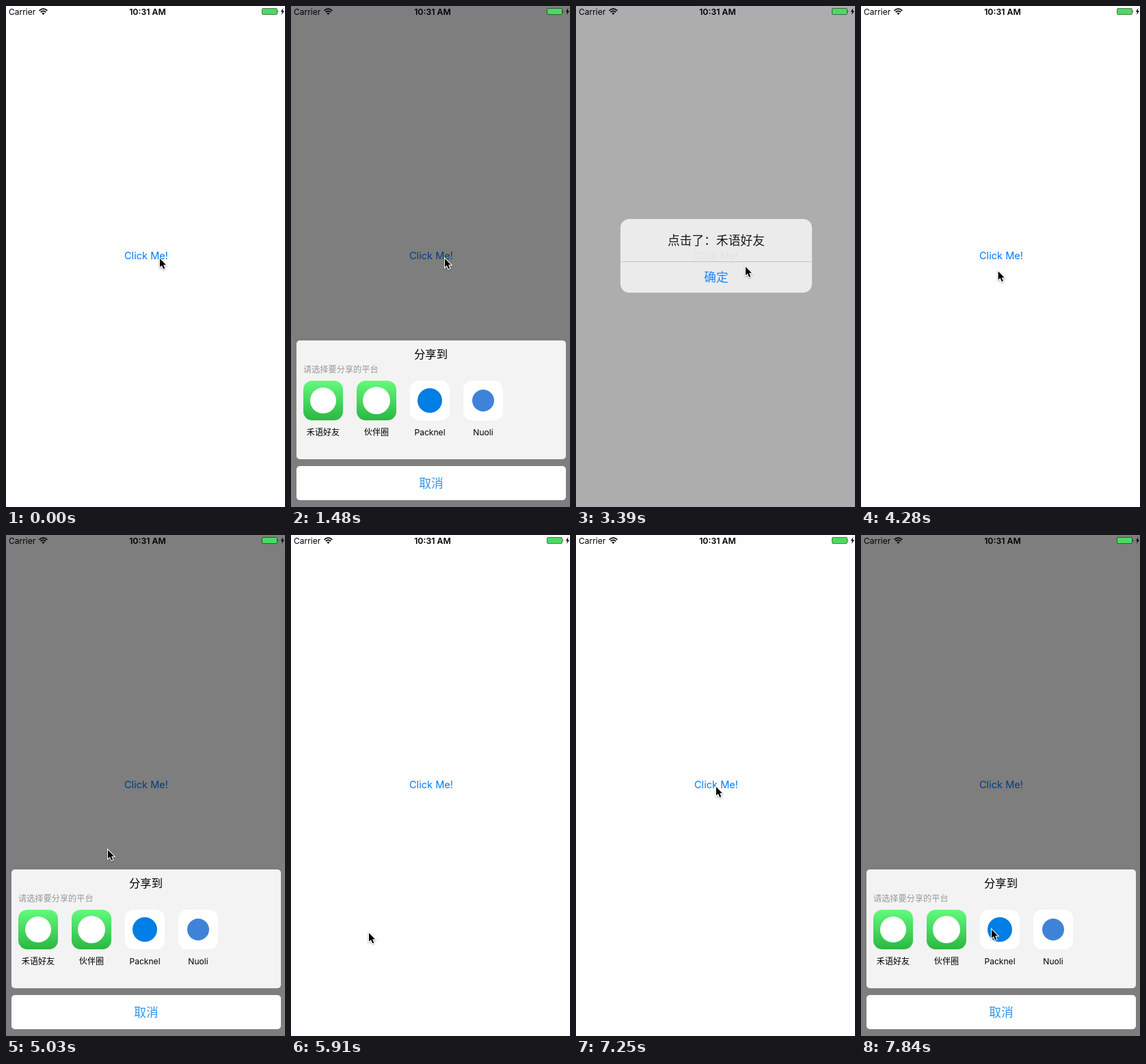
Animation, 408 px wide and 734 px high, one loop 7.99 s. Source, as an HTML page:

```html
<!DOCTYPE html>
<html lang="zh-CN">
<head>
<meta charset="utf-8">
<title>Share sheet</title>
<style>
html, body { margin: 0; width: 100%; height: 100%; overflow: hidden; background: #fefefe; }
svg { display: block; width: 408px; height: 734px; }
text { font-family: Inter, 'Noto Sans CJK SC', 'Noto Sans CJK', sans-serif; }
.mid { text-anchor: middle; }
</style>
</head>
<body>
<svg viewBox="0 0 408 734">
  <defs>
    <linearGradient id="green" x2="0" y2="1">
      <stop stop-color="#62fb7c"/><stop offset="1" stop-color="#2bb741"/>
    </linearGradient>
    <filter id="shadow" x="-50%" y="-50%" width="200%" height="200%">
      <feDropShadow dx="0" dy="1" stdDeviation="1" flood-opacity=".4"/>
    </filter>
  </defs>
  <rect width="408" height="734" fill="#fefefe"/>
  <text class="mid" x="205" y="371.3" font-size="14.6" fill="#007aff">Click Me!</text>
  <rect id="dim" width="408" height="734"/>

  <g id="sheet">
    <rect x="8" y="490" width="394" height="174" rx="5" fill="#f3f3f3"/>
    <text class="mid" x="204.5" y="516.3" font-size="16.4">分享到</text>
    <text x="18" y="536.5" font-size="12.2" fill="#999">请选择要分享的平台</text>
    <g id="apps"></g>
    <rect x="8" y="674" width="394" height="50" rx="5" fill="#fff"/>
    <text class="mid" x="205" y="705.7" font-size="17.8" fill="#2f96f3">取消</text>
  </g>

  <g id="alert">
    <rect x="-133" y="-51.3" width="266" height="102.6" rx="12.3" fill="#f2f2f2"/>
    <text id="message" class="mid" y="-15.6" font-size="16.85" font-weight="500" fill="#0a0a0a"></text>
    <path d="M-133 8.2H133" stroke="#cacaca"/>
    <text class="mid" y="36.4" font-size="16.85" fill="#1080ff">确定</text>
  </g>

  <g id="status">
    <text x="4" y="12.8" font-size="12">Carrier</text>
    <path d="M48.6 6.8Q54.5 1.4 60.4 6.8M50.7 9Q54.5 5.6 58.3 9" fill="none" stroke="#000" stroke-width="1.7"/>
    <path d="M54.5 13L52.4 10.6Q54.5 8.9 56.6 10.6Z"/>
    <text class="mid" x="207" y="12.8" font-size="12.3" font-weight="600">10:31 AM</text>
    <rect x="374.5" y="3.5" width="22" height="9" rx="1.5" fill="#4cd964" stroke="#000" stroke-width=".5"/>
    <path d="M397.6 6.2Q399.2 8 397.6 9.8Z"/>
    <path d="M405.4 3L401.8 8.6H404.1L403 13L407 7.2H404.6Z"/>
  </g>

  <path id="cursor" d="M1 2V14.6L3.9 11.9L6.2 17.2L8.3 16.3L6.1 11.2H10Z"
        stroke="#fff" stroke-width="2" paint-order="stroke" filter="url(#shadow)"/>
</svg>
<script>
const LOOP = 7990, STEP = 147.9; // ms; the screen refreshes once per step
const $ = id => document.getElementById(id);
const ramp = (n, start, length) => Math.min(1, Math.max(0, (n - start) / length));

const apps = [
  { name: '禾语好友', tile: 'url(#green)', mark: '#fff', r: 19 },
  { name: '伙伴圈', tile: 'url(#green)', mark: '#fff', r: 20 },
  { name: 'Packnel', tile: '#fff', mark: '#007ee5', r: 18 },
  { name: 'Nuoli', tile: '#fff', mark: '#3f83d8', r: 16 }
];
$('apps').innerHTML = apps.map(({ name, tile, mark, r }, i) => {
  const x = 47 + 78 * i;
  return `<rect x="${x - 29}" y="549" width="58" height="58" rx="13" fill="${tile}"/>
    <circle cx="${x}" cy="578" r="${r}" fill="${mark}"/>
    <text class="mid" x="${x}" y="628.5" font-size="12.1">${name}</text>`;
}).join('');

// Each visit opens the sheet, then picks the app with the same index.
const visits = [
  { open: 7, pick: 20 },
  { open: 31, pick: 38 },
  { open: 50, pick: Infinity }
];

// Mouse moves: start step, length in steps, destination.
const moves = [
  [11, 2, 201, 613], [14, 2, 110, 659], [16, 2, 63, 585],
  [21, 2, 247, 380], [23, 3, 212, 397], [28, 3, 175, 366],
  [33, 2.3, 113, 581],
  [40, 3, 248, 433], [43, 1, 212, 397], [46, 3, 204, 367],
  [51, 2, 190, 576]
];

function cursorAt(n) {
  let x = 224, y = 368;
  for (const [start, length, toX, toY] of moves) {
    const p = ramp(n, start, length);
    x += (toX - x) * p;
    y += (toY - y) * p;
  }
  return `${x} ${y}`;
}

function draw(now) {
  const n = Math.floor((now % LOOP + 14) / STEP);
  const index = Math.max(0, visits.findLastIndex(v => v.open <= n));
  const { open, pick } = visits[index];
  const rise = ramp(n, open, 3) - ramp(n, pick, 2);
  const sheet = 1 - (1 - rise) ** 2;
  const grow = ramp(n, pick + 2, 1.25);
  const alert = grow - ramp(n, pick + 7, 2);

  $('cursor').setAttribute('transform', `translate(${cursorAt(n)})`);
  $('dim').setAttribute('opacity', Math.max(sheet * .5, alert * .4));
  $('sheet').setAttribute('transform', `translate(0 ${244 * (1 - sheet)})`);
  $('alert').setAttribute('transform', `translate(205 366) scale(${1.265 - .265 * grow})`);
  $('alert').setAttribute('opacity', Math.min(1, alert * 1.13));
  $('message').textContent = '点击了：' + apps[index].name;
  requestAnimationFrame(draw);
}
draw(0);
</script>
</body>
</html>
```
